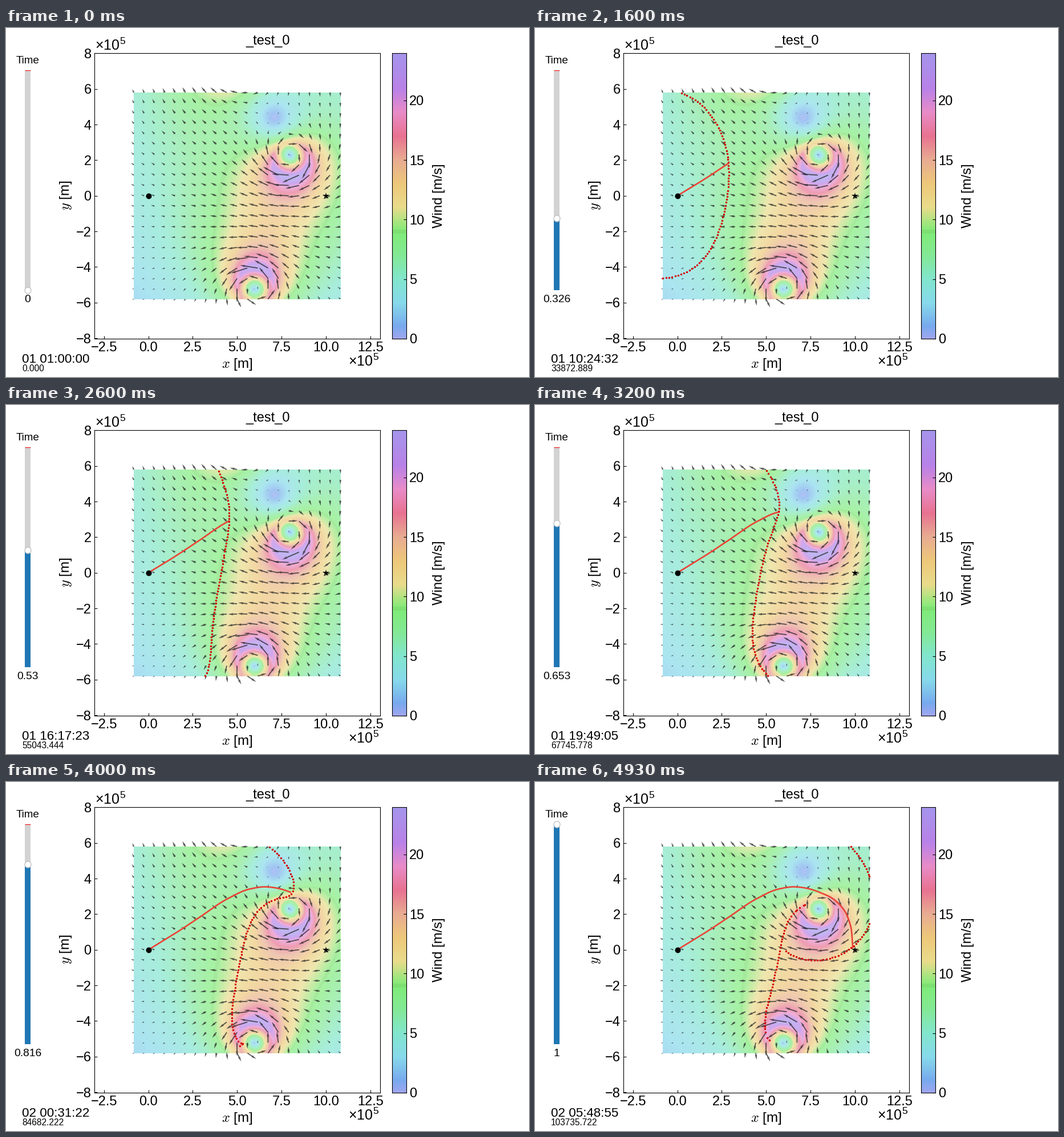
Write a matplotlib script that moves like this. It is 917 px wide and 611 px high and loops after 5060 ms.

```python
import numpy as np
import matplotlib.pyplot as plt
from matplotlib.animation import FuncAnimation
from matplotlib.colors import LinearSegmentedColormap
from matplotlib.patches import Rectangle

W, H, DPI = 917, 611, 100
LOOP, TICKS = 5060, 110
INTERVAL = LOOP // TICKS
LAST = 49                       # index of the final time step
DURATION = 103735.722           # simulated seconds
STEP = DURATION / LAST / 1e5    # distance (1e5 m) covered per step at 1 m/s
AIRSPEED = 14.11
LOW, HIGH, HALF = -0.82, 10.8, 5.8

plt.rcParams.update({
    "font.family": "Liberation Sans", "mathtext.fontset": "cm", "font.size": 17,
    "xtick.direction": "in", "ytick.direction": "in", "axes.linewidth": 0.8,
})

# Rankine vortices: centre x, centre y, circulation (positive is anticlockwise)
VORTICES = [(5, 8, -24.8), (8, 2, -20), (6, -5, 20)]


def wind(x, y):
    u, v = 0.0, 0.0
    for cx, cy, strength in VORTICES:
        dx, dy = x - cx, y - cy
        k = strength / np.maximum(dx * dx + dy * dy, 1.0)
        u, v = u - k * dy, v + k * dx
    return u, v


def rates(x, y, heading):
    """Zermelo's equations for the position and heading of an extremal."""
    h = 1e-3
    u, v = wind(x, y)
    ux, vx = wind(x + h, y)
    uy, vy = wind(x, y + h)
    ux, vx, uy, vy = (ux - u) / h, (vx - v) / h, (uy - u) / h, (vy - v) / h
    c, s = np.cos(heading), np.sin(heading)
    turn = s * s * vx + s * c * (ux - vy) - c * c * uy
    return np.array([AIRSPEED * c + u, AIRSPEED * s + v, turn])


def gaps(state):
    return np.hypot(np.diff(state[0]), np.diff(state[1]))


def refine(state, low=0.05, high=0.25):
    """Insert midpoints where neighbouring extremals drift apart."""
    gap = gaps(state)
    at = np.flatnonzero((gap > low) & (gap < high))
    middle = (state[:, at] + state[:, at + 1]) / 2
    return np.insert(state, at + 1, middle, axis=1)


def compute_fronts(count=800, substeps=6, cell=0.15, spacing=0.172):
    state = np.zeros((3, count))
    state[2] = np.linspace(-np.pi, np.pi, count, endpoint=False)
    reached = np.full((90, 90), np.inf)
    dt = STEP / substeps
    fronts = [(np.array([]), np.array([]))]
    for step in range(1, LAST + 1):
        for sub in range(substeps):
            half = state + rates(*state) * dt / 2
            state = refine(state + rates(*half) * dt)
            x, y, _ = state
            alive = (x > LOW) & (x < HIGH) & (abs(y) < HALF)
            alive &= np.hypot(x - 8, y - 2) > 0.9
            alive &= np.hypot(x - 6, y + 5) > 0.65
            state = state[:, alive]
            x, y, _ = state
            cells = ((x + 1) / cell).astype(int), ((y + 6) / cell).astype(int)
            np.minimum.at(reached, cells, step - 1 + (sub + 1) / substeps)
        # keep only points still on the leading edge
        fresh = step - reached[cells] <= np.where(y > 0, 4, 7)
        front = state[:2, fresh]
        length = np.concatenate([[0], np.cumsum(gaps(front))])
        pick = np.diff(np.floor(length / spacing), prepend=-1) > 0
        fronts.append(front[:, pick])
    return fronts


ROUTE_STEPS = np.array([0, 8, 16, 26, 32, 36, 40, 42, 44, 46, 49])
ROUTE = np.array([(0, 0), (1.55, .95), (2.87, 1.82), (4.54, 2.91), (5.73, 3.42),
                  (6.75, 3.53), (8, 3.23), (8.78, 2.85), (9.4, 2.2), (9.73, 1.4),
                  (9.87, .12)])
SLOPES = np.gradient(ROUTE, ROUTE_STEPS, axis=0)


def route_at(t):
    """Cubic Hermite interpolation of the route at step values t."""
    k = np.clip(np.searchsorted(ROUTE_STEPS, t, side="right") - 1, 0, len(ROUTE) - 2)
    span = (ROUTE_STEPS[k + 1] - ROUTE_STEPS[k])[:, None]
    s = (t - ROUTE_STEPS[k])[:, None] / span
    return ((1 + 2 * s) * (1 - s) ** 2 * ROUTE[k] + s * (1 - s) ** 2 * span * SLOPES[k]
            + s * s * (3 - 2 * s) * ROUTE[k + 1] + s * s * (s - 1) * span * SLOPES[k + 1])


WIND_COLORS = [
    (0, "#a0a6f0"), (1, "#78aaee"), (3, "#87daeb"), (5, "#82e6cd"), (7, "#84e995"),
    (8.8, "#80ec7a"), (8.82, "#7de073"), (9.13, "#80e073"), (9.15, "#88ea7a"),
    (11, "#e9dc8c"), (13, "#eec87a"), (15, "#e8ac92"), (17, "#e87391"),
    (19, "#e98cc8"), (21, "#b982e8"), (24, "#a596ec"),
]
cmap = LinearSegmentedColormap.from_list(
    "wind", [(speed / 24, color) for speed, color in WIND_COLORS], N=512)

fig = plt.figure(figsize=(W / DPI, H / DPI), dpi=DPI, facecolor="white")


def pixel_axes(left, top, right, bottom):
    return fig.add_axes([left / W, 1 - bottom / H, (right - left) / W, (bottom - top) / H])


# wind map
ax = pixel_axes(154.5, 43.5, 656, 544)
n = 51
gx = LOW + (np.arange(n) + 0.5) * (HIGH - LOW) / n
gy = -HALF + (np.arange(n) + 0.5) * 2 * HALF / n
ax.imshow(np.hypot(*wind(*np.meshgrid(gx, gy))), origin="lower", cmap=cmap, vmin=0,
          vmax=24, alpha=0.7, extent=(LOW, HIGH, -HALF, HALF), aspect="auto",
          interpolation="bilinear", zorder=0)
qx, qy = np.meshgrid(np.linspace(LOW, HIGH, 21), np.linspace(-HALF, HALF, 21))
ax.quiver(qx, qy, *wind(qx, qy), scale=385, width=0.0036, headwidth=2.2,
          color="#222222", alpha=0.74, zorder=2)
ax.set(xlim=(-3.05, 13.04), ylim=(-8.03, 8.03))
ax.set_xticks(np.arange(-2.5, 13, 2.5))
ax.set_xticklabels([f"{v:.1f}".replace("-", "−") for v in np.arange(-2.5, 13, 2.5)])
ax.set_yticks(range(-8, 9, 2))
ax.set_yticklabels([str(v).replace("-", "−") for v in range(-8, 9, 2)])
route_line, = ax.plot([], [], color="#ea4335", lw=1.9, zorder=3)
front_dots, = ax.plot([], [], "o", color="#d40000", ms=2.5, mew=0, zorder=4)
ax.plot(0, 0, "o", color="black", ms=7.2, mew=0, zorder=5)
ax.plot(10, 0, "*", color="black", ms=9, mew=0, zorder=5)

# colour bar
bar = pixel_axes(677, 43.5, 702, 544)
bar.imshow(np.linspace(0, 24, 512)[:, None], origin="lower", cmap=cmap,
           extent=(0, 1, 0, 24), aspect="auto")
bar.set_xticks([])
bar.yaxis.tick_right()
bar.set_yticks(range(0, 21, 5))

# labels and slider, placed in pixels
panel = pixel_axes(0, 0, W, H)
panel.set(xlim=(0, W), ylim=(H, 0))
panel.axis("off")


def label(x, y, text, size, **options):
    return panel.text(x, y, text, fontsize=size, **options)


label(459, 29, "_test_0", 17, ha="center")
label(156, 39, r"×10$^{\mathregular{5}}$", 18)
label(600, 592, r"×10$^{\mathregular{5}}$", 18)
label(405.5, 595, r"$x$ [m]", 17.5, ha="center")
label(105, 293, r"$y$ [m]", 17.5, ha="center", va="center", rotation=90)
label(759, 294, "Wind [m/s]", 17.2, ha="center", va="center", rotation=90)
label(38, 62, "Time", 13.6, ha="center")
value_text = label(38, 480, "", 13.9, ha="center")
clock_text = label(28, 586, "", 16.1)
seconds_text = label(28, 601, "", 11.2)

TRACK_TOP, TRACK_BOTTOM = 73.5, 458.5
panel.add_patch(Rectangle((33, TRACK_TOP), 10, TRACK_BOTTOM - TRACK_TOP, fc="#d3d3d3"))
panel.plot([33, 43], [TRACK_TOP] * 2, color="#f03030", lw=1, solid_capstyle="butt")
filled = panel.add_patch(Rectangle((33, TRACK_BOTTOM), 10, 0, fc="#1f77b4", zorder=3))
knob, = panel.plot([38], [TRACK_BOTTOM], "o", ms=8, mfc="white", mec="#bfbfbf",
                   mew=0.9, zorder=4)

FRONTS = compute_fronts()


def step_at(ms):
    """Steps alternate between 130 ms and 70 ms on screen."""
    return min(LAST, 2 * (ms // 200) + (ms % 200 >= 130))


def update(tick):
    step = step_at(tick * INTERVAL + INTERVAL - 1)
    value = step / LAST
    seconds = DURATION * value

    route_line.set_data(*route_at(np.linspace(0, step, 4 * step + 1)).T)
    front_dots.set_data(*FRONTS[step])

    level = TRACK_BOTTOM + value * (TRACK_TOP - TRACK_BOTTOM)
    filled.set_height(level - TRACK_BOTTOM)
    knob.set_ydata([level])
    value_text.set_text(f"{value - 2e-4 * (0 < value < 1):.3g}")

    total = int(seconds) + 3600
    day, rest = divmod(total, 86400)
    clock_text.set_text(f"{day + 1:02d} {rest // 3600:02d}:{rest // 60 % 60:02d}:{rest % 60:02d}")
    seconds_text.set_text(f"{seconds:.3f}")
    return route_line, front_dots, filled, knob, value_text, clock_text, seconds_text


anim = FuncAnimation(fig, update, frames=TICKS, interval=INTERVAL, repeat=True,
                     repeat_delay=0, blit=False)
plt.show()
```
